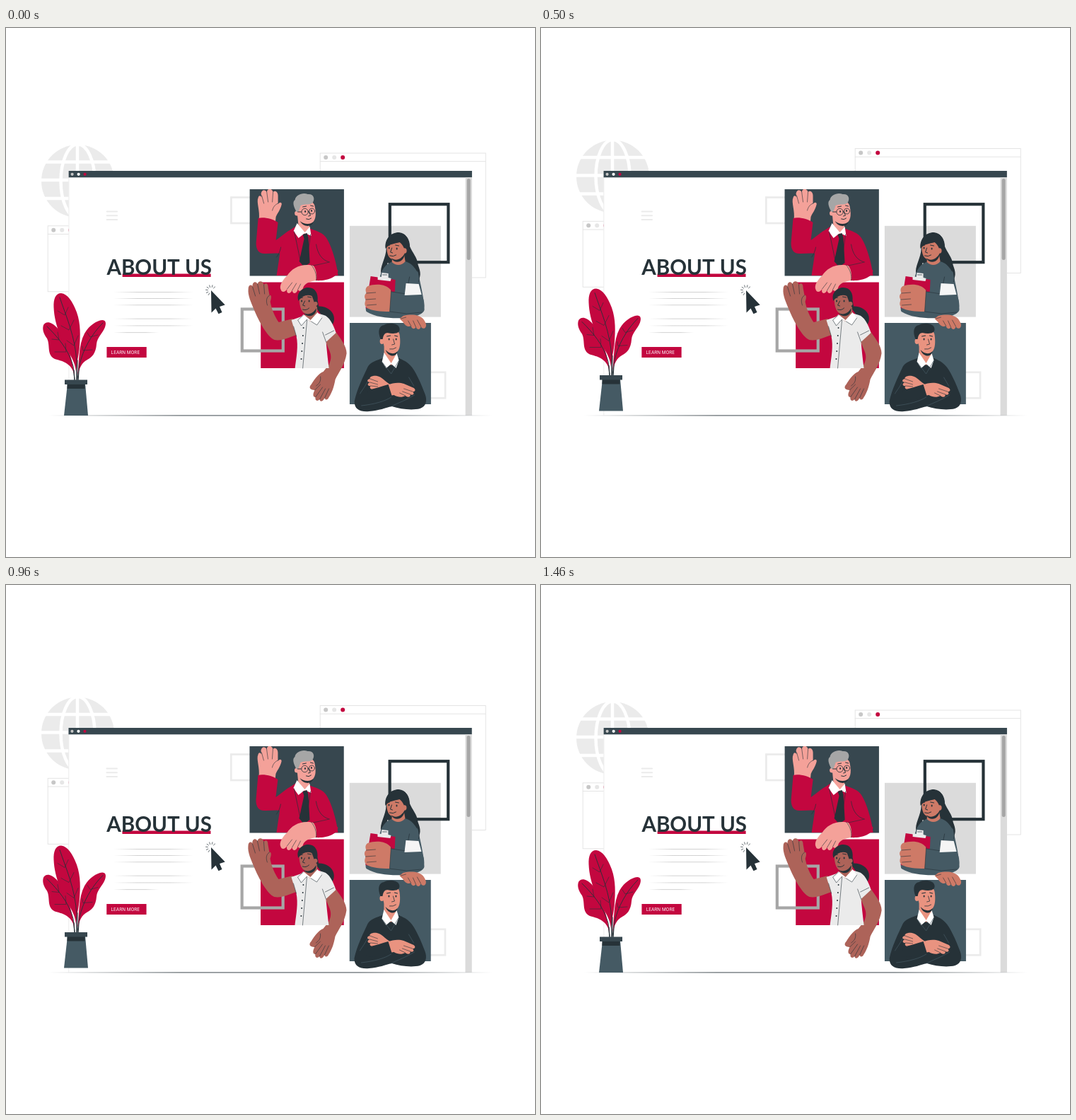
Animation of 748 by 748 pixels, one loop 1.5 s. Source, as an HTML page with a canvas:

```html
<!DOCTYPE html>
<html lang="en">
<head>
<meta charset="utf-8">
<title>About us</title>
<style>
html, body { margin: 0; width: 100%; height: 100%; overflow: hidden; background: #fff; }
canvas { display: block; width: 748px; height: 748px; }
</style>
</head>
<body>
<canvas id="stage"></canvas>
<script>
const SIZE = 748, LOOP = 1500;
const RED = '#c3073f', DARK = '#263238', NAVY = '#37474f', SLATE = '#455a64';
const PALE = '#ebebeb', SILVER = '#dbdbdb', GREY = '#a6a6a6', WHITE = '#fff';
const PINK = '#f4a199', BROWN = '#ad6359', TAN = '#ce7a67', PEACH = '#e99380';

const canvas = document.getElementById('stage');
const ratio = window.devicePixelRatio || 1;
canvas.width = canvas.height = SIZE * ratio;
const ctx = canvas.getContext('2d');
ctx.lineCap = 'round';

const cache = new Map();
function path(d) {
  if (!cache.has(d)) cache.set(d, new Path2D(d));
  return cache.get(d);
}
function fill(color, d) {
  ctx.fillStyle = color;
  ctx.fill(path(d));
}
function line(color, width, d) {
  ctx.strokeStyle = color;
  ctx.lineWidth = width;
  ctx.stroke(path(d));
}
function rect(color, x, y, w, h) {
  ctx.fillStyle = color;
  ctx.fillRect(x, y, w, h);
}
function frame(color, width, x, y, w, h) {
  ctx.strokeStyle = color;
  ctx.lineWidth = width;
  ctx.strokeRect(x, y, w, h);
}
function dot(color, x, y, rx, ry = rx) {
  ctx.beginPath();
  ctx.ellipse(x, y, rx, ry, 0, 0, Math.PI * 2);
  ctx.fillStyle = color;
  ctx.fill();
}
function ring(color, width, x, y, rx, ry = rx) {
  ctx.beginPath();
  ctx.ellipse(x, y, rx, ry, 0, 0, Math.PI * 2);
  ctx.strokeStyle = color;
  ctx.lineWidth = width;
  ctx.stroke();
}
function fadingLine(color, x0, x1, y, height) {
  const g = ctx.createLinearGradient(x0, 0, x1, 0);
  g.addColorStop(0, color + '00');
  g.addColorStop(0.3, color);
  g.addColorStop(0.7, color);
  g.addColorStop(1, color + '00');
  rect(g, x0, y, x1 - x0, height);
}
function text(str, x, y, font, color) {
  ctx.font = font;
  ctx.fillStyle = color;
  ctx.fillText(str, x, y);
}

function globe() {
  dot(PALE, 101.5, 216.5, 51.5);
  line(WHITE, 4.5, 'M48 189.5H155M48 215H155M48 241H155M101 163V270');
  ring(WHITE, 4.5, 101.5, 216.5, 24, 52);
}

function backWindow(x, y, w, h) {
  rect(WHITE, x, y, w, h);
  frame('#e4e4e4', 1, x, y, w, h);
  line('#e4e4e4', 1, `M${x} ${y + 11.7}H${x + w}`);
  ['#c7c7c7', '#e6e6e6', RED].forEach((c, i) => dot(c, x + 8 + i * 12, y + 6, 3));
}

function plant() {
  line(DARK, 1.3, 'M97 499L96 484M100 499L101 470M102 499L103 482');
  fill(RED, 'M97 491C92 472 78 471 69 468C57 462 63 449 58 439C53 432 51 426 53 420C55 416 60 415 65 418C76 424 90 446 97 491Z');
  fill(RED, 'M101 491C104 470 102 449 111 432C118 420 128 414 136 413C141 413 142 417 140 423C136 433 129 437 128 447C127 460 122 465 115 469C107 473 104 481 101 491Z');
  fill(RED, 'M99 487C98 468 86 458 77 436C71 420 68 408 67.5 395C67 383 70 375 78 375C87 376 94 386 100 402C106 419 105 436 104 450C103 463 100 472 99 487Z');
  line(DARK, 0.9, 'M58 422C74 438 88 454 95 478L97 497M137 417C120 434 109 455 104 476L101 497M76 381C85 408 98 436 100 473V497');
  line(DARK, 0.6, 'M65 440L75 441L73 430M69 458L85 458L84 446M115 431L119 437L130 434M108 450L109 456L122 455M73 400L83 406L88 395M78 421L89 427L96 413M86 442L96 449L102 435');
  fill(SLATE, 'M87 503H112L116 548H82Z');
  rect(DARK, 86.5, 503, 25, 7);
  rect(NAVY, 83, 497.5, 32, 6.5);
}

function manWaving() {
  fill(PINK, 'M358 271C360 259 354 246 357 240C358 236 361 237 362 240L361 234C362 228 367 228 369 232C370 227 376 226 378 232C381 229 385 232 385 237L385 249C388 245 391 247 390 250C388 258 384 262 382 267L381 277Z');
  line(DARK, 0.6, 'M362 237L365 248M369 231L371 246M378 232L377 246M385 248C380 250 378 254 377 258');
  fill(RED, 'M357 269C365 267 378 270 385 275L382 300C391 294 399 286 409 282L412 300L398 322C390 317 380 319 368 319C358 320 354 314 354 304Z');
  fill(RED, 'M411 280C399 286 392 298 389 310L383 350H470C468 332 460 305 452 295C446 288 436 286 429 283Z');
  fill(PINK, 'M412 260L414 281L423 292L430 283L428 272Z');
  fill(PINK, 'M411 252C411 243 436 241 437 252C439 262 439 270 434 275C428 280 418 277 414 270Z');
  fill(DARK, 'M416 273C422 278 431 278 435 274C433 282 421 282 416 273Z');
  dot(PINK, 412, 262, 3.5);
  fill(GREY, 'M411 260C407 252 405 246 409 243C410 236 420 232 427 235C435 234 438 241 434 247C430 251 422 248 417 251C416 254 415 258 413 260Z');
  ring(DARK, 0.8, 423, 260, 4.7);
  ring(DARK, 0.8, 433, 259, 4);
  dot(DARK, 423.5, 259.5, 1, 1.4);
  dot(DARK, 432.5, 258.5, 1, 1.4);
  line(DARK, 1, 'M420 253L425 252M431 251L435 252M413 260L418 260M428 259L431 265L428 266M425 270Q429 272 432 269');
  fill(WHITE, 'M412 276L407 287L414 297L423 290L432 294L430 281L423 289Z');
  fill(DARK, 'M420 292L426 290L428 296L430 332L422 338L415 330L422 298Z');
  line(DARK, 0.7, 'M408 288L416 326M431 292L426 328M389 310C388 316 386 320 383 324M439 306C441 320 448 329 458 331');
  fill(RED, 'M470 343C468 354 452 358 438 357L430 336C440 336 452 334 458 330Z');
  fill(PINK, 'M429 335C414 334 404 341 398 350C392 356 386 364 389 370C390 374 395 374 398 369C396 376 402 377 405 371C406 377 411 376 413 370C416 374 420 371 421 366C424 360 432 358 439 357C441 349 438 339 435 336Z');
  line(DARK, 0.6, 'M398 369L405 360M405 371L411 361M413 370L417 362M432 335C438 342 440 350 439 357M435 336L458 331');
}

function womanWaving() {
  fill(DARK, 'M439 394C450 392 462 398 464 408C466 418 459 426 452 424C450 412 446 404 439 396Z');
  fill(BROWN, 'M351 398C347 388 342 378 343 369C343 363 348 362 349 366C348 359 354 357 356 362C358 356 364 358 365 363C369 359 371 362 371 367L373 378C376 377 376 382 374 387C376 398 381 409 386 416L406 411L411 434C400 438 389 443 380 441C370 437 358 415 351 398Z');
  line(DARK, 0.6, 'M349 366L353 379M356 362L359 376M365 363L366 376M373 378C368 381 368 387 370 392');
  fill(BROWN, 'M452 443L467 430C474 440 482 450 482 460C480 476 470 488 466 497C464 508 461 516 457 522C455 527 451 526 451 523C448 529 444 529 444 525C440 529 437 526 438 522C434 522 434 517 437 512C430 512 428 508 432 504C437 496 443 488 449 486L457 476C461 468 460 462 458 457Z');
  line(DARK, 0.6, 'M437 512L445 504M438 522L448 508M444 525L452 510M451 523L457 510M445 493C446 500 443 503 439 506');
  fill(PALE, 'M421 407L404 413L411 436C414 450 411 465 409 481H457C455 465 454 455 453 444L467 431C463 418 457 408 450 406L440 403Z');
  fill(BROWN, 'M425 398L422 409L431 415L441 404L440 392Z');
  fill(BROWN, 'M415 380C415 368 437 367 439 382C440 394 437 404 428 405C419 405 415 396 415 380Z');
  fill(DARK, 'M421 403C429 407 436 402 439 396C440 407 428 411 421 403Z');
  fill(DARK, 'M414 386C410 375 419 367 428 367C438 367 442 376 441 385L443 396C437 394 436 386 433 379C427 376 419 378 414 386Z');
  dot(BROWN, 438, 390, 3);
  fill(WHITE, 'M421 405L413 413L418 421L426 412L432 415L440 420L447 410L441 402L431 413Z');
  line(DARK, 0.6, 'M421 406L413 413L418 421L426 412M432 415L440 420L447 410M426 413L420 481M411 436L407 422M453 444L448 430M452 434L464 428');
  for (let y = 424; y < 475; y += 11) dot(DARK, 421 - (y - 424) * 0.07, y, 1);
  dot(DARK, 418.5, 386, 1, 1.5);
  dot(DARK, 429, 386, 1, 1.5);
  line(DARK, 1, 'M416 382L420 381M427 380L432 381M423 386L420 392L423 393M420 398Q425 400 429 396');
}

function womanClipboard() {
  fill(DARK, 'M538 312C536 298 544 289 556 289C566 290 570 298 571 308C575 318 582 324 583 335C587 345 588 353 581 358C584 347 575 342 568 338L540 332C538 340 538 346 531 348C528 338 538 325 538 312Z');
  fill(SLATE, 'M545 331C533 336 530 347 527 360C512 380 507 395 510 401C525 410 545 411 566 410C585 408 592 402 592 398C592 384 586 360 583 345C578 336 570 331 564 330Z');
  fill(TAN, 'M547 318L546 331C552 337 560 336 565 330L563 318Z');
  fill(TAN, 'M539 307C537 298 564 296 565 309C566 320 561 328 551 328C542 328 538 320 539 307Z');
  fill(DARK, 'M545 325C552 331 560 326 564 319C564 330 551 336 545 325Z');
  fill(DARK, 'M537 312C535 297 547 288 558 290C569 292 573 304 571 314C577 322 584 330 582 345C576 334 565 328 564 319C565 313 562 307 557 303C550 305 542 305 537 312Z');
  dot(TAN, 564, 315, 3, 3.7);
  dot(DARK, 542, 311, 1, 1.5);
  dot(DARK, 553, 312, 1, 1.5);
  line(DARK, 1, 'M539 308L543 307M551 307L556 308M546 311L544 317L547 318M543 322Q548 324 552 321');
  line(DARK, 0.7, 'M581 335C584 345 586 350 584 359M571 352L567 372');
  fill(RED, 'M516 351L551 356L549 400L509 396Z');
  fill(PALE, 'M526 351L531 352L532 346L541 347L541 353L545 354L544 358L526 356Z');
  line(NAVY, 0.8, 'M533 349H539');
  fill(SLATE, 'M544 373C560 372 575 372 588 377C594 388 592 400 588 402C570 405 555 404 541 401Z');
  fill(TAN, 'M512 365C524 361 538 362 545 371L543 401C530 401 518 400 511 396C506 392 508 388 509 384C506 380 508 376 510 375C508 370 509 367 512 365Z');
  line(DARK, 0.6, 'M510 375L523 374M509 384L523 383M511 392L524 391M545 371L543 401L567 404L588 402M546 373L566 376');
  fill('#f5f5f5', 'M566 361L584 362L588 377L564 378Z');
  fill(TAN, 'M562 407C575 404 585 406 590 411C594 416 596 421 593 424C590 426 588 424 587 422C586 427 582 427 580 423C577 427 574 425 573 421C569 424 564 420 562 416L557 411Z');
  line(DARK, 0.6, 'M573 421L569 414M580 423L576 414M587 422L582 413M559 411L566 409');
}

function manCrossed() {
  fill(DARK, 'M535 466C524 470 515 473 512 479C505 494 497 510 493 528C493 540 502 543 514 542C528 541 537 537 546 535C558 539 575 541 586 538C595 535 596 526 593 518C587 502 579 484 572 477C567 471 558 468 552 465Z');
  fill(PEACH, 'M535 448L535 467L545 477L553 466L552 452Z');
  fill(PEACH, 'M532 432C534 423 556 424 557 434C559 448 557 459 549 460C540 461 533 453 532 432Z');
  fill(DARK, 'M537 455C543 462 551 461 554 457C553 466 541 466 537 455Z');
  dot(PEACH, 532, 443, 3, 4);
  fill(DARK, 'M530 440C526 430 527 421 535 420C541 416 557 417 557 426C557 432 549 433 540 431C536 431 534 434 533 440Z');
  dot(DARK, 542, 440, 1, 1.5);
  dot(DARK, 552, 440, 1, 1.5);
  line(DARK, 1.2, 'M539 436L544 435M550 435L554 436');
  line(DARK, 0.8, 'M548 440L550 447L546 448M543 454Q548 455 552 452');
  fill(WHITE, 'M535 459L532 472L538 481L545 475L552 481L556 470L553 460L545 474Z');
  line(SLATE, 0.7, 'M513 497C508 508 503 513 501 517M570 494L577 506M545 522C536 528 521 532 503 534M545 535C555 530 567 526 578 519M532 472L545 489L556 470');
  fill(PEACH, 'M545 505C536 500 532 493 525 492C518 491 514 494 515 496C510 497 511 501 515 501C510 503 512 507 516 506C513 510 518 512 523 510C532 509 537 514 543 517Z');
  fill(PEACH, 'M540 505C548 501 557 501 563 503L577 509C581 512 578 515 575 514C579 517 576 520 572 518C573 522 569 523 565 520C560 523 554 522 549 519L537 521Z');
  line(DARK, 0.6, 'M515 496L526 500M515 501L526 504M516 506L526 507M575 514L563 510M572 518L561 514M565 520L557 516');
  fill(DARK, 'M512 513C522 509 532 507 541 504L546 520C534 524 522 526 510 526Z');
}

function mainWindow() {
  rect(WHITE, 89, 202, 570, 345.5);
  line('#e8e8e8', 0.8, 'M89.3 211V547');
  rect(NAVY, 89, 202, 570.3, 9.3);
  ['#c7c7c7', WHITE, RED].forEach((c, i) => dot(c, 94 + i * 9, 206.8, 2.1));
  rect(SILVER, 650, 211.3, 9.3, 336.5);
  line(GREY, 5, 'M654.6 215.5V325.5');

  line(PALE, 2, 'M143 259.5H157.5M143 265.2H157.5M143 271H157.5');
  rect(RED, 165, 347.5, 125, 4.5);
  text('ABOUT US', 142.8, 348.7, 'bold 29.5px Lato, "Open Sans", sans-serif', DARK);
  rect(RED, 142.8, 451, 56.3, 15);
  text('LEARN MORE', 149, 460.8, '6.3px Inter, "Open Sans", sans-serif', WHITE);

  frame(PALE, 2.7, 318.8, 239.5, 40, 36.5);
  frame(PALE, 2.7, 585, 486.8, 36.5, 36.5);
  rect(NAVY, 345, 228, 133.3, 122.5);
  rect(RED, 360.6, 359.5, 117.7, 121.5);
  rect(SILVER, 486.3, 279.8, 129, 128.8);
  rect(SLATE, 486.3, 417, 115, 115);
  frame(GREY, 4.2, 334.2, 397.5, 58, 59);
  frame(DARK, 4.2, 543.2, 249.2, 82.6, 82);
  manWaving();
  womanWaving();
  manCrossed();
  womanClipboard();
}

function paragraph() {
  [373, 382, 391.3, 410.7, 420.5].forEach(y => fadingLine('#cccccc', 152, 265, y, 0.9));
  fadingLine('#cccccc', 152, 216, 430.2, 0.9);
}

function cursor() {
  fill(DARK, 'M290 371L290.5 402.5L296.5 396.5L300.5 404.3L305.5 402L302 394L309.7 391.5Z');
  for (let i = 0; i < 7; i++) {
    const a = (120 + i * 33) * Math.PI / 180, c = Math.cos(a), s = Math.sin(a);
    line(DARK, 0.7, `M${290 + 4.7 * c} ${371 + 4.7 * s}L${290 + 7.5 * c} ${371 + 7.5 * s}`);
  }
}

// Side-to-side offsets at every tenth of the loop.
const SHAKE = [0, -1, 2, -4, 4, -4, 4, -4, 2, -1, 0];
function shakeAt(p) {
  const i = Math.floor(p * 10), f = p * 10 - i;
  return 0.97 * (SHAKE[i] + (SHAKE[i + 1] - SHAKE[i]) * f);
}
function floatAt(p) {
  return -9.7 * (1 - Math.abs(2 * p - 1));
}
function shifted(x, y, draw) {
  ctx.save();
  ctx.translate(x, y);
  draw();
  ctx.restore();
}

function render(now) {
  const p = ((now + 20) % LOOP) / LOOP;
  const dx = shakeAt(p) - 0.25, dy = floatAt(p) + 0.25;
  ctx.setTransform(ratio, 0, 0, ratio, 0, 0);
  rect(WHITE, 0, 0, SIZE, SIZE);
  shifted(0, dy, () => {
    globe();
    backWindow(444.2, 177, 234, 176);
    backWindow(59.2, 279.8, 80, 93);
  });
  shifted(dx, 0, mainWindow);
  paragraph();
  fadingLine(DARK, 60, 688, 547.5, 0.9);
  shifted(0, dy, plant);
  cursor();
}

function tick() {
  render(performance.now());
  requestAnimationFrame(tick);
}
tick();
</script>
</body>
</html>
```
